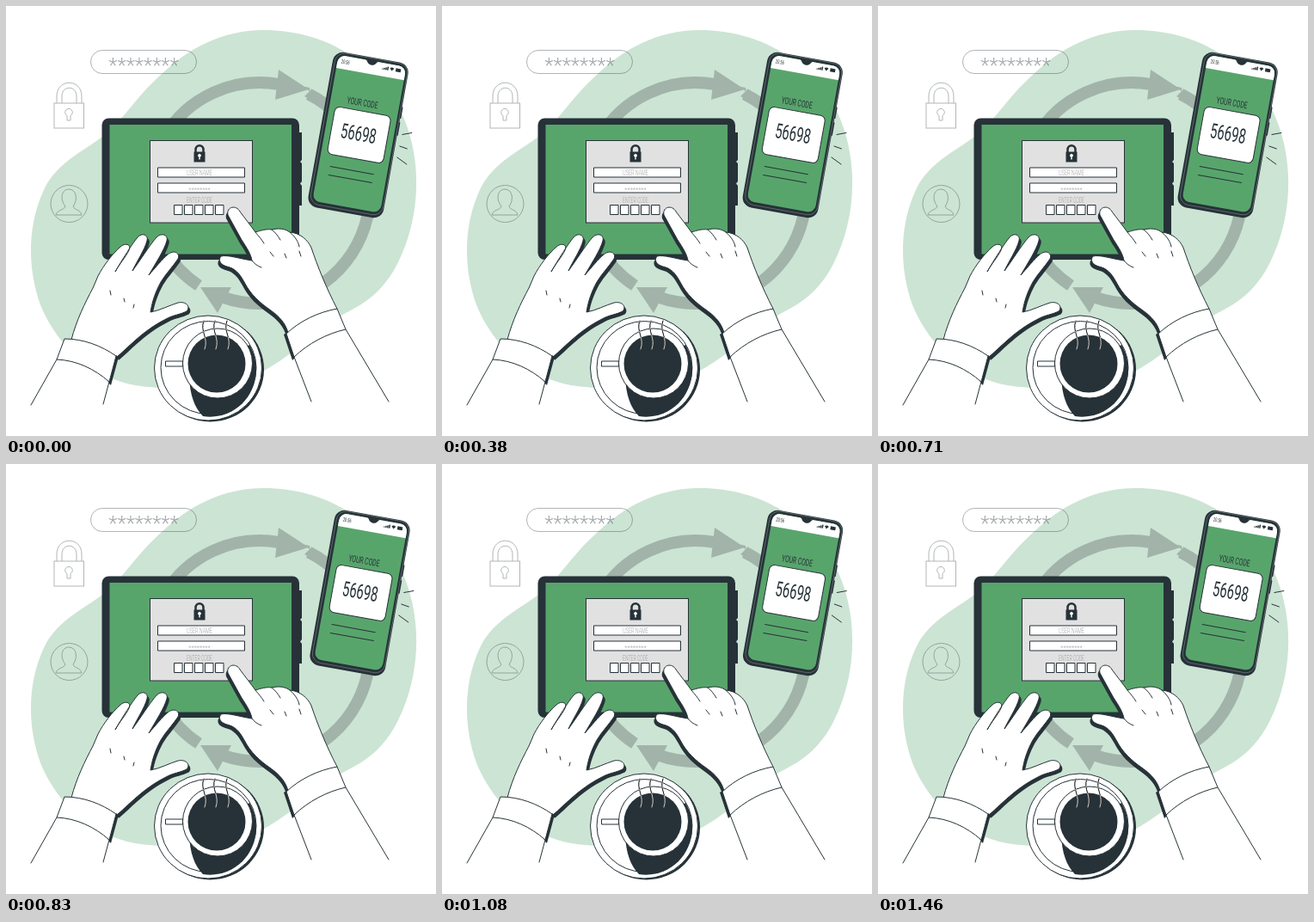
Write an HTML page that moves like this. It is 500 by 500 pixels and loops after 1.5 s.

```html
<!DOCTYPE html>
<html lang="en">
<head>
<meta charset="utf-8">
<title>One-time code login</title>
<style>
  html, body { margin: 0; width: 100%; height: 100%; overflow: hidden; background: #fff; }
  svg { display: block; width: 100vw; height: 100vh; }
  text { font-family: Roboto, "Liberation Sans", sans-serif; text-anchor: middle; fill: #263238; }
  .line { fill: none; stroke: #263238; stroke-linecap: round; stroke-linejoin: round; }
  .paper { fill: #fff; stroke: #263238; stroke-linejoin: round; }
  .dark { fill: #263238; }
  .green { fill: #58a56c; }
  .faint { fill: none; stroke: #263238; opacity: .36; }
  .ring { fill: none; stroke: #a2b4a9; stroke-width: 14; }
  .head { fill: #a2b4a9; }
  .hint { fill: #a0a0a0; }
  .narrow { transform: scaleX(.62); }
</style>
</head>
<body>
<svg viewBox="0 0 500 500">
  <defs>
    <path id="leftHand" d="M76 388C82 365 92 345 101 328L107 314C113 302 124 288 133 280C139 275 146 277 143 284C140 291 131 301 127 309C135 295 147 276 153 269C158 263 166 266 164 273C161 284 152 297 147 308C156 296 167 278 175 269C181 263 189 266 187 273C184 284 174 299 166 313C174 304 182 294 188 289C195 283 203 287 200 294C194 303 186 311 180 321C174 332 170 343 168 356C179 354 190 348 200 345C210 343 215 350 210 355C202 359 195 359 186 364C172 371 160 380 150 389C142 396 136 402 129 408Z"/>
    <path id="rightHand" d="M258 243C256 233 268 231 272 239C278 247 285 256 290 263C296 261 303 259 309 260C317 258 325 259 330 263C342 264 351 272 355 281C362 302 372 327 385 352L328 380C325 369 318 361 308 354C295 345 284 335 277 321C271 310 266 305 257 303C250 301 246 296 250 291C258 289 272 294 286 296C285 289 280 281 274 272Z"/>
  </defs>

  <path fill="#cce4d4" d="M300 28C370 28 430 65 458 120C485 175 483 245 455 300C432 345 400 352 380 366C350 385 335 405 300 424C260 443 200 449 150 441C100 432 60 395 41 350C24 305 24 250 48 206C66 178 92 168 116 149C140 128 150 107 181 79C212 50 250 28 300 28Z"/>

  <!-- circular arrows -->
  <path class="ring" d="M183.500 153A128.500 128.500 0 0 1 318 91.200M352 102.500A128.500 128.500 0 0 1 252 338.700M224 325A128.500 128.500 0 0 1 183.500 282"/>
  <path class="head" d="M317 74L352 97L313 109ZM344 93L353 95L356 110L347 105L353 99ZM226 327L262 327L246 357Z"/>

  <!-- outline icons -->
  <rect class="faint" x="98.500" y="51.500" width="123" height="27" rx="13.500"/>
  <text x="160" y="77" font-size="24" font-weight="300" opacity=".42">********</text>
  <g class="faint">
    <rect x="56" y="113" width="34.500" height="29"/>
    <path d="M59 113V105C59 84 88 84 88 105V113M65 113V105C65 92 82 92 82 105V113M71 127.500A4.300 4.300 0 1 1 75 127.500V133H71Z"/>
  </g>
  <g class="faint">
    <circle cx="73.500" cy="230" r="21.500"/>
    <path d="M58 243C60 236 67 238 69 233C62 224 65 213 73 213C82 213 84 225 78 233C80 238 86 236 88 243Z"/>
  </g>

  <!-- tablet -->
  <path class="dark" d="M338 147H344V179L342 181L344 183V204L342 206.500L344 209V232H338Z"/>
  <rect class="dark" x="111.500" y="130.500" width="229.500" height="164.500" rx="8"/>
  <rect class="green" x="120.500" y="138" width="211.500" height="150.500"/>
  <rect x="167.500" y="156.500" width="119" height="95.500" fill="#e1e1e1" stroke="#263238"/>
  <path class="line" stroke-width="2.500" d="M220.500 170V167C220.500 160.500 229.500 160.500 229.500 167V170"/>
  <rect class="dark" x="218.500" y="169.500" width="13" height="12"/>
  <path fill="#fff" d="M224.300 175.500A1.800 1.800 0 1 1 225.700 175.500V178.500H224.300Z"/>
  <g class="paper">
    <rect x="176.500" y="188" width="101" height="11"/>
    <rect x="176.500" y="206" width="101" height="11"/>
    <path d="M195.500 231.500h9.500v11h-9.500ZM207.500 231.500h9.500v11h-9.500ZM219.500 231.500h9.500v11h-9.500ZM231.500 231.500h9.500v11h-9.500ZM243.500 231.500h9.500v11h-9.500Z"/>
  </g>
  <g transform="translate(225 0)" font-weight="300">
    <text class="hint narrow" y="197" font-size="8.800">USER NAME</text>
    <text class="hint" y="215.500" font-size="7.500">********</text>
    <text class="hint narrow" y="229.500" font-size="8.200">ENTER CODE</text>
  </g>

  <!-- left arm -->
  <use href="#leftHand" class="dark" x="2.500" y="3.500"/>
  <use href="#leftHand" class="paper"/>
  <path class="line" d="M121 331L122 336M137 340L138 344M149 347L148 351"/>
  <path class="dark" d="M128 406L131 408L122 441L118 437Z"/>
  <path fill="#fff" d="M59 411L29 464H113L120 437Z"/>
  <path class="line" d="M59 411L29 464M120 437L113 463"/>
  <path class="paper" d="M68 387C90 387 111 395 128 407L120 437C103 422 82 412 59 411Z"/>

  <!-- right arm -->
  <use href="#rightHand" class="dark" x="-2" y="4"/>
  <use href="#rightHand" class="paper"/>
  <path class="line" d="M290 263C294 268 297 271 300 276M309 260C313 263 316 267 319 272M286 296C289 300 292 302 297 304M307 286L311 291M324 288L326 293M330 263C336 268 340 274 341 280M341 285L343 291"/>
  <path class="dark" d="M326 380L323 382L333 412L337 408Z"/>
  <path fill="#fff" d="M335 408L356 461H445L395 376Z"/>
  <path class="line" d="M335 408L355 460M395 376L445 460"/>
  <path class="paper" d="M326 381C342 366 363 356 385 352L395 376C373 381 352 392 335 408Z"/>

  <!-- coffee -->
  <ellipse class="dark" cx="237.500" cy="422.500" rx="62.500" ry="61"/>
  <ellipse class="paper" cx="235" cy="421" rx="62.500" ry="61"/>
  <ellipse class="paper" cx="235.500" cy="420.500" rx="55.500" ry="54"/>
  <path class="dark" d="M213 432C214 452 219 467 229 477C262 482 290 457 291 424C291 412 288 402 283 394Z"/>
  <circle class="paper" cx="246" cy="415.500" r="40.500"/>
  <rect class="paper" x="185.500" y="413" width="20" height="6"/>
  <circle class="dark" cx="245" cy="416" r="33.500"/>
  <path fill="none" stroke="#fff" stroke-linecap="round" style="mix-blend-mode:difference" d="M230 366C225 378 236 386 231 399M243 366C238 378 249 386 244 399M257 366C252 378 263 386 258 399"/>

  <g id="phone">
    <path class="line" d="M461 149.500L472 147.500M458 163L466.500 166M455 176L466 184"/>
    <g transform="translate(409.300 149.700) rotate(10.200)">
      <rect class="dark" x="40" y="-41" width="6" height="14" rx="1"/>
      <rect class="dark" x="40" y="-23" width="6" height="16" rx="1"/>
      <rect class="dark" x="-44" y="-91.500" width="89" height="183.500" rx="12"/>
      <rect x="-41.500" y="-90.500" width="85.500" height="179" rx="11" fill="none" stroke="#8b9693" stroke-width=".5"/>
      <rect class="green" x="-38.500" y="-87.500" width="80" height="172.500" rx="8.500"/>
      <path fill="#fff" d="M-38.500-72V-79A8.500 8.500 0 0 1-30-87.500H33A8.500 8.500 0 0 1 41.500-79V-72Z"/>
      <path class="dark" d="M-7-88C-4-87-4-82.500 1-82.500S6-87 9-88Z"/>
      <path class="dark" d="M14-80v-1h1.500v1zM16-80v-2h1.500v2zM18-80v-3h1.500v3zM20-80v-4h1.500v4zM23-83q2.500-2 5 0l-2.500 3zM30-84h6v4h-6z"/>
      <text class="narrow" x="-47" y="-78.500" font-size="6.500">20:56</text>
      <text class="narrow" x="-2" y="-33.800" font-size="11">YOUR CODE</text>
      <rect class="paper" x="-31.500" y="-28" width="66" height="56" rx="6"/>
      <text class="narrow" x="1" y="6.800" font-size="24">56698</text>
      <path class="line" d="M-25 42H26M-25 52H26"/>
    </g>
  </g>
</svg>
<script>
  const phone = document.getElementById('phone');
  const offsets = [0, -1, 2, -4, 4, -4, 4, -4, 2, -1, 0];
  const loop = 1500, steps = 36;

  // Linear shake, held at 24 pictures per second.
  function draw(now) {
    const step = Math.floor(((now + 5) % loop) / loop * steps);
    const pos = (step + 0.6) / steps * (offsets.length - 1);
    const i = Math.floor(pos);
    const x = offsets[i] + (offsets[i + 1] - offsets[i]) * (pos - i);
    phone.setAttribute('transform', `translate(${x.toFixed(2)} 0)`);
  }

  const start = performance.now();
  function tick() {
    draw(performance.now() - start);
    requestAnimationFrame(tick);
  }
  tick();
</script>
</body>
</html>
```
